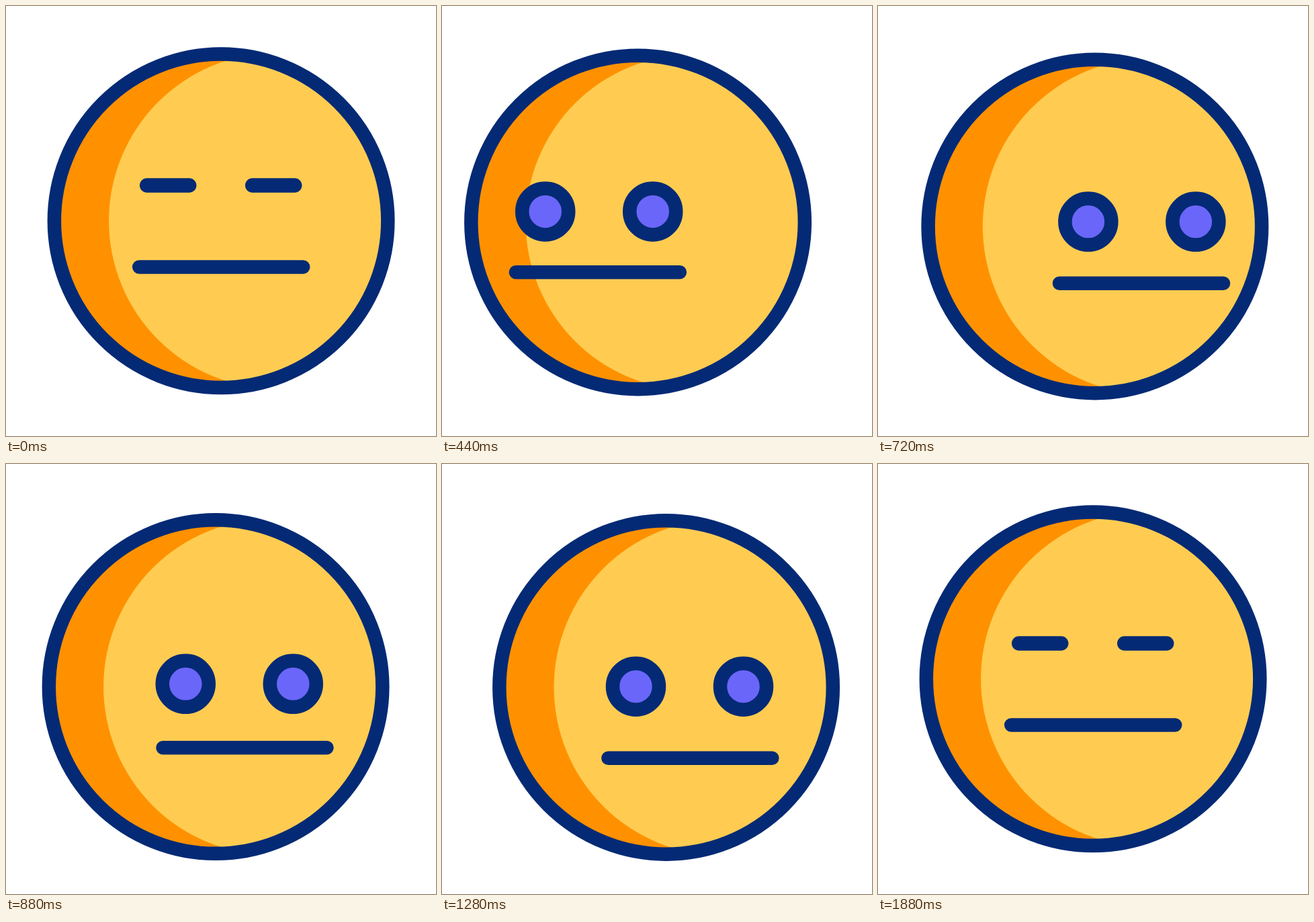
An HTML page with a canvas for the animation above (2000 ms loop, 640x640 px).

```html
<!DOCTYPE html>
<html lang="en">
<head>
<meta charset="utf-8">
<title>Head shake</title>
<style>
  html, body { margin: 0; width: 100%; height: 100%; overflow: hidden; background: #fff; }
  canvas { display: block; width: 640px; height: 640px; }
</style>
</head>
<body>
<canvas id="stage" width="640" height="640"></canvas>
<script>
const g = document.getElementById('stage').getContext('2d');
const NAVY = '#042a75', YELLOW = '#ffcc51', ORANGE = '#ff9100', VIOLET = '#6b66fa';
const LOOP = 2000, STEP = 40, LAST = 1880, LINE = 20.5;

// Turning points of the shake: time, head offset, features offset.
const TURNS = [
  [40, 0, 0], [440, -28.5, -86], [765, 4.5, 84], [1050, -30.5, -86],
  [1280, 13.5, 49], [1520, 0, -30], [1860, 0, 0]
];

const ramp = (t, from, to) => Math.min(1, Math.max(0, (t - from) / (to - from)));
const ease = (t, from, to) => {
  const u = ramp(t, from, to);
  return u * u * (3 - 2 * u);
};

// Each turn eases in on top of the one before it.
function swing(t, column) {
  let x = 0;
  for (let i = 1; i < TURNS.length; i++) {
    const a = TURNS[i - 1], b = TURNS[i];
    x += (b[column] - a[column]) * ease(t, a[0], b[0]);
  }
  return x;
}

function disc(x, y, r, color) {
  g.beginPath();
  g.arc(x, y, r, 0, 7);
  g.fillStyle = color;
  g.fill();
}

function bar(x, y, half, width) {
  g.lineWidth = width;
  g.beginPath();
  g.moveTo(x - half, y);
  g.lineTo(x + half, y);
  g.stroke();
}

function face(x, y) {
  g.save();
  g.beginPath();
  g.arc(x, y, 248, 0, 7);
  g.clip();
  disc(x, y, 248, ORANGE);
  disc(x + 83, y, 250, YELLOW);
  g.restore();
  g.lineWidth = LINE;
  g.beginPath();
  g.arc(x, y, 248.25, 0, 7);
  g.stroke();
}

function eye(x, y, open) {
  const rx = 31.5 + 3 * open, ry = 34.5 * open;
  if (ry < 1) return bar(x, y, rx, LINE + 1);
  g.lineWidth = LINE;
  g.beginPath();
  g.ellipse(x, y, rx, ry, 0, 0, 2 * Math.PI);
  g.closePath();
  g.fillStyle = VIOLET;
  g.fill();
  g.stroke();
}

function draw(now) {
  const t = Math.min(Math.floor(now % LOOP / STEP) * STEP, LAST);
  const headY = 319.8 + 15 * (ease(t, 220, 1160) - ease(t, 1200, 1520));
  const away = 1 - ease(t, 1460, 1880);
  const drop = 52.8 * (1 - Math.exp(-Math.max(0, t - 40) / 335)) * away;
  const sag = 45.5 * ramp(t, 285, 1520) * away;
  const open = ease(t, 80, 280) - ease(t, 1340, 1480);
  const gap = 78.5 + 1.5 * open;

  g.clearRect(0, 0, 640, 640);
  g.strokeStyle = NAVY;
  g.lineCap = g.lineJoin = 'round';
  face(320.1 + swing(t, 1), headY);
  for (const side of [-1, 1]) {
    eye(319.7 + swing(t - 5, 2) + side * gap, headY - 52.8 + drop, open);
  }
  bar(320.2 + 1.03 * swing(t - 13, 2), headY + 68.7 + sag, 122, LINE);
}

const start = performance.now();
function tick() {
  draw(performance.now() - start);
  requestAnimationFrame(tick);
}
tick();
</script>
</body>
</html>
```
